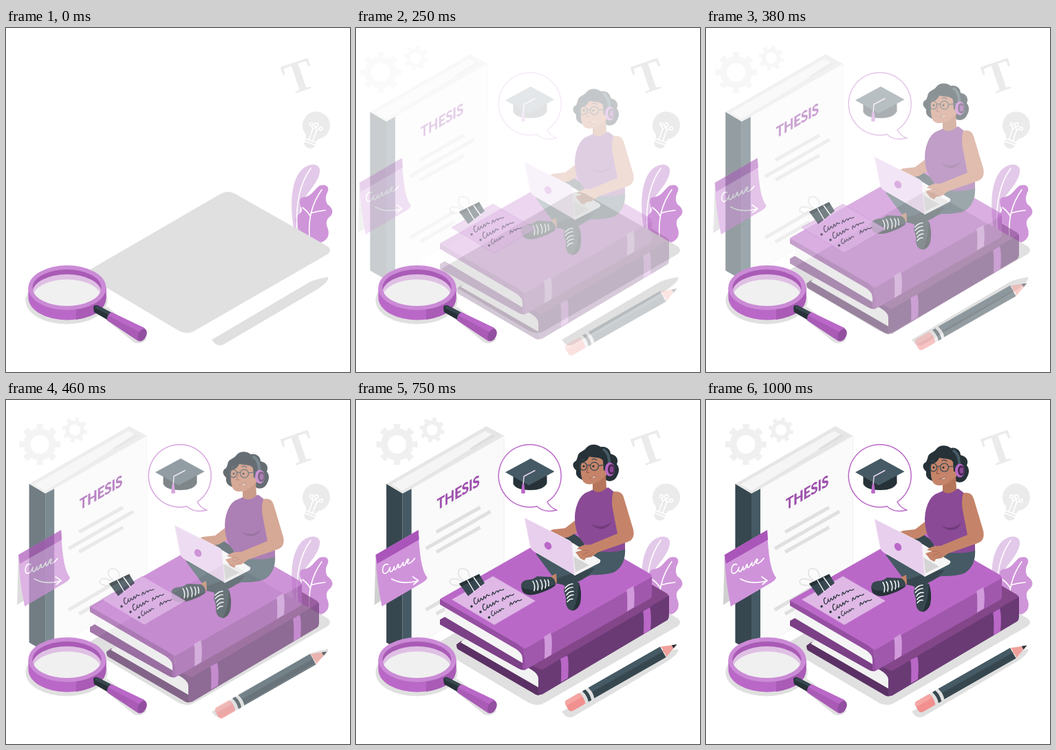
An HTML page that plays this animation: 500x500 px, repeating every 1.04 s.

```html
<!DOCTYPE html>
<html lang="en">
<head>
<meta charset="utf-8">
<title>Thesis</title>
<style>
html, body { margin: 0; width: 100%; height: 100%; overflow: hidden; background: #fff; }
svg { display: block; width: 100vw; height: 100vh; }
.line { fill: none; stroke-linecap: round; stroke-linejoin: round; }
</style>
</head>
<body>
<svg viewBox="0 0 500 500">
<defs>
  <path id="word" d="M5-8C2-10-1-2 1 0S7-3 8-5C6-4 7 1 9-1S12-5 12-3 12 0 14-1 16-5 17-4 16 0 18-1 21-5 22-4 22-1 25-2"/>
  <path id="tail" d="M0 0C1-3 3-5 3-3S3 0 5-1 7-4 9-3 8 0 10-1 13-3 14-2 15 0 19-1"/>
  <clipPath id="lens"><ellipse cx="88.500" cy="377.500" rx="50" ry="26.500"/></clipPath>
</defs>

<!-- resting scenery -->
<text transform="translate(432.500 91) rotate(-19)" text-anchor="middle" font-family="'Liberation Serif', serif" font-weight="700" font-size="66" fill="#ebebeb">T</text>
<g transform="translate(451 141.500) rotate(20)" fill="#ebebeb">
  <circle r="20"/>
  <path d="M-17 10Q-8 17-8 23H8Q8 17 17 10zM-8 24H8V30Q6 35 0 35T-8 30z"/>
  <g class="line" stroke="#fff" stroke-width="1.600">
    <path d="M-8 23.500H8M-8 27.500H8M-3 23V7L-6 3M3 23V7L6 3M-3 7L0 2 3 7"/>
    <circle cx="-7" cy="1" r="2.300"/><circle cy="-1" r="2.600"/><circle cx="8" cy="2" r="2.300"/>
  </g>
</g>
<path fill="#e3c9e9" d="M419 296C413 262 413 226 428 208 437 197 453 195 456 205 458 221 437 240 431 252 426 265 426 280 426 300z"/>
<path fill="#cf95d9" d="M441 312C428 302 422 288 421 278 422 271 430 270 430 264 428 257 424 249 431 246 444 246 448 234 456 229 463 227 470 229 468 237 464 245 464 250 467 256 474 261 477 267 472 273 464 279 465 285 468 292 471 303 466 309 457 312z"/>
<path class="line" stroke="#fff" stroke-width="1.600" d="M423 291Q420 235 443 204M441 304Q438 264 459 235M443 269Q453 266 464 265M442 273Q438 266 431 261"/>
<path fill="#e0e0e0" d="M112 357L312 241Q322 235 333 241L467 317Q475 323 467 329L276 439Q264 447 251 440z"/>
<path fill="#e0e0e0" d="M299 453L306 449 440 370Q446 366 468 362 470 364 464 371L454 379 316 460Q310 463 304 459z"/>

<!-- gears -->
<g data-move="x" fill="none" stroke="#f0f0f0">
  <g transform="translate(58 64.500)">
    <circle r="18.500" stroke-width="10"/>
    <circle r="25.500" stroke-width="9" pathLength="16" stroke-dasharray=".9 1.100" stroke-dashoffset=".45"/>
  </g>
  <g transform="translate(109 43.500) rotate(12)">
    <circle r="11" stroke-width="6"/>
    <circle r="15.500" stroke-width="5.500" pathLength="16" stroke-dasharray=".9 1.100" stroke-dashoffset=".45"/>
  </g>
</g>

<!-- standing book -->
<g data-move="x">
  <path fill="#e6e6e6" d="M42.500 122L188 38 213.500 52 66 136z"/>
  <path fill="#f5f5f5" d="M50 123L186 45 198 51 66 132z"/>
  <path fill="#dedede" d="M196 50L201 52 168 71 163 71z"/>
  <path fill="#fafafa" stroke="#ebebeb" stroke-width=".7" d="M79 129L213.500 52V282L79 359z"/>
  <path fill="#37474f" d="M42.500 122L66 136V366L42.500 352.500z"/>
  <path fill="#455a64" d="M66 136L79 129V359L66 366z"/>
  <text transform="matrix(.866 -.5 0 1 116 160)" font-family="Lato, sans-serif" font-weight="700" font-size="21.500" fill="#9c4fab" stroke="#9c4fab" stroke-width=".5">THESIS</text>
  <path fill="none" stroke="#e0e0e0" stroke-width="5" d="M115 192L179 156M100 216L194 162M115 221L179 185M100 305L165 267M115 311L165 282"/>
</g>
<g data-move="x">
  <path fill="#d0d0d0" d="M27 225L25 298 40 288 60 215z"/>
  <path fill="#cf93da" d="M27 225L89 189C90 212 92 246 102 258Q101 262 94 266L36 300Q28 262 27 225z"/>
  <path fill="#aa55b9" d="M27 225L89 189 90 203 29 238z"/>
  <g class="line" stroke="#fff" stroke-width="1.600">
    <path d="M45 239C37 236 35 250 39 252 44 253 47 246 48 243 46 249 49 252 52 247L54 242C53 248 55 248 58 243 59 237 61 238 60 243 62 246 65 239 67 236 66 243 69 242 71 236 74 228 77 231 73 236 73 240 79 237 84 230"/>
    <path d="M50 260Q66 269 88 263M81 257L89 262.500 82 268"/>
  </g>
</g>

<!-- stacked books and reader -->
<g data-move="y">
  <path fill="#5b3064" d="M146 357L153 352 266 412 270 429Q264 433 258 428L148 364Q146 362 146 357z"/>
  <path fill="#f2f2f2" d="M152 354L186 335 262 388 266 400V420z"/>
  <path fill="#834689" d="M240 384L430 270 452 283Q457 287 452 291L272 398Q265 392 240 384z"/>
  <path fill="#6a3a75" d="M246 389Q264 397 265 406V429L270 430 452 322Q455 320 455 314V286L270 394 256 388z"/>
  <path fill="#ba68c8" d="M297 378Q299 384 298 412L308 406Q310 382 307 373zM417 309Q419 315 418 342L428 336Q430 313 427 303z"/>
  <path fill="#f5f5f5" d="M129 299L238 361 244 372V390L129 323z"/>
  <path fill="#7b4086" d="M122 321L129 317 242 384 246 394Q241 395 236 392L122 328z"/>
  <path fill="#ba68c8" d="M122 291L300 190Q308 186 316 190L427 254Q433 259 427 263L246 368z"/>
  <path fill="#9f58ab" d="M236 358Q246 364 246 376V394L427 291Q430 289 430 285V259L246 363z"/>
  <path fill="#954fa2" d="M122 291L236 357Q246 364 246 376V394L242 392V378Q242 370 233 364L122 299z"/>
  <path fill="#d09adb" d="M273 346Q275 352 274 378L284 372Q286 350 283 340zM393 278Q395 284 394 309L404 303Q406 282 403 272z"/>

  <!-- legs and shoes -->
  <path fill="#37474f" d="M284 198L312 193 331 206 332 222 300 215z"/>
  <path fill="#c5846a" d="M326 171L304 188 286 190 278 194 291 198 298 203 309 201 332 188z"/>
  <path fill="#455a64" d="M330 222L391 215Q393 240 377 251 368 256 342 256L303 272 288 261 312 246z"/>
  <path fill="#455a64" d="M261 225L290 264 303 258 320 256 280 224z"/>
  <path fill="#37474f" d="M290 262L316 253 347 246Q334 266 304 271L290 268z"/>
  <path fill="#c5846a" d="M283 258L291 254 292 267 285 271z"/>
  <path fill="#37474f" d="M240 272Q240 264 250 263 258 263 263 258L284 259Q291 263 290 271 282 278 265 283 249 288 243 281z"/>
  <path fill="#263238" d="M240 273Q250 283 290 270 289 274 265 283 248 288 242 280z"/>
  <path fill="#37474f" d="M304 268Q314 262 324 267 328 281 326 295 324 306 315 308 306 307 305 296 306 288 302 280z"/>
  <path fill="#263238" d="M324 267Q329 281 326 297 323 306 315 308 324 290 324 267z"/>
  <path class="line" stroke="#fff" stroke-width="1.500" d="M257 265Q261 271 259 279M262 264Q266 270 264 278M268 263Q272 269 270 277M274 263Q277 268 275 275M279 263Q281 267 280 272M304 275Q309 269 315 269M304 280Q309 274 315 274M306 285Q310 279 316 280M307 290Q310 285 316 285M307 295Q311 290 315 291"/>

  <!-- body and laptop -->
  <path fill="#8a4a96" d="M333 137L347 131 367 129 376 136 385 170 391 210V219Q374 225 346 221 326 211 320 190 316 172 320 158 324 143 333 137z"/>
  <path fill="#6f3b7a" d="M342 182Q357 191 372 178 365 190 355 189 347 188 342 182z"/>
  <path fill="#f5f5f5" d="M314 209L355 234Q356 237 353 239L318 257 312 252z"/>
  <path fill="#d5d5d5" d="M316 229L339 242 319 252z"/>
  <path fill="#e8cfed" stroke="#f5e9f7" stroke-width=".8" d="M245 173L310 206Q314 208 314 212L318 256 258 221Q254 218 253 214z"/>
  <ellipse cx="279" cy="213.500" rx="4.800" ry="6" transform="rotate(-35 279 213.500)" fill="#ba68c8"/>
  <path fill="#c5846a" d="M374 135Q386 133 389 143L403 190Q406 204 395 208L352 223 342 230 334 231 332 235 326 232 319 223Q324 221 329 220L321 218Q328 211 341 212L380 196 374 165Q370 148 374 135z"/>
  <path class="line" stroke="#a56951" stroke-width=".8" d="M329 220L337 220M330 226L340 222M334 231L344 224"/>

  <!-- head -->
  <path fill="#263238" d="M322 85C323 76 331 77 335 71 341 64 351 66 356 70 364 68 370 74 370 80 379 82 382 88 379 95 384 101 382 108 379 113 375 121 366 121 362 117L330 118C318 114 320 107 320 104 313 98 315 92 320 90z"/>
  <path fill="#b5755b" d="M344 116L363 107 364 130Q352 140 344 132z"/>
  <path fill="#c5846a" d="M328 90C326 101 326 112 330 120 334 126 346 125 353 120L365 110 363 90 350 80 334 84z"/>
  <path fill="#263238" d="M326 94C333 92 337 89 339 84 346 86 355 84 359 90L360 104 366 105 372 85 350 70 330 77z"/>
  <path fill="none" stroke="#455a64" stroke-width="4" d="M359 73Q369 79 368 95"/>
  <ellipse cx="369" cy="102.500" rx="7" ry="10" fill="#ba68c8"/>
  <ellipse cx="371" cy="102.500" rx="5" ry="7.500" fill="#4a2852"/>
  <ellipse cx="371.500" cy="102.500" rx="2.800" ry="4.500" fill="#8a4a96"/>
  <g class="line" stroke="#37474f" stroke-width="1.200">
    <ellipse cx="330.500" cy="98" rx="5" ry="5.800"/><circle cx="346.500" cy="98" r="6"/>
    <path d="M335.500 97Q338 95 340.500 97M352.500 97L363 96M327 89L332 88M343 88Q347 86 350 89"/>
  </g>
  <g fill="#263238"><circle cx="331" cy="98" r="1.500"/><circle cx="345" cy="98" r="1.500"/></g>
  <path class="line" stroke="#91543f" stroke-width="1" d="M338 98L335 107 339 107"/>
  <path fill="#fff" stroke="#91543f" stroke-width=".6" d="M339 115Q345 115 348 111 348 117 339 115z"/>
</g>

<!-- notes with binder clip -->
<g data-move="" data-fade=".6">
  <path fill="#dfb8e6" stroke="#c583d0" stroke-width=".6" d="M139 290L199 256 261 292 201 327z"/>
  <g fill="#263238"><circle cx="168" cy="300" r="1.800"/><circle cx="181" cy="308" r="1.800"/><circle cx="193.500" cy="316" r="1.800"/></g>
  <g class="line" stroke="#263238" stroke-width="1.200">
    <use href="#word" transform="translate(173 297) rotate(-28)"/>
    <use href="#tail" transform="translate(198 284) rotate(-25)"/>
    <use href="#word" transform="translate(186 306) rotate(-28)"/>
    <use href="#tail" transform="translate(213 292) rotate(-28)"/>
    <use href="#word" transform="translate(198 314) rotate(-28) scale(.8)"/>
    <use href="#tail" transform="translate(224 299) rotate(-25)"/>
  </g>
  <path class="line" stroke="#e3e3e3" stroke-width="1.700" d="M155 268C143 272 133 267 137 262 140 258 150 260 156 265M156 262C145 254 148 245 155 245 164 246 164 252 165 257"/>
  <path fill="#37474f" d="M150 267L179 253 187 266 163 285z"/>
  <path fill="#263238" d="M150 267L179 253 181 257 153 271z"/>
  <path class="line" stroke="#fff" stroke-width="1.400" d="M162 262L172 279M171 258L181 272"/>
</g>

<!-- speech bubble -->
<g data-move="" data-fade="1.500">
  <path fill="#fff" stroke="#ba68c8" stroke-width="1.500" d="M263 154.500A45.500 45.500 0 1 1 278 148Q282 156 291.500 160 274 165 263 154.500z"/>
  <path fill="#263238" d="M228.500 108V122Q233 131 253 131T277.500 121V108z"/>
  <path fill="#455a64" d="M217 105L254 85 288.500 104 251 124z"/>
  <path class="line" stroke="#ead5ee" stroke-width="1.500" d="M260 102.500L244 111 243 124"/>
  <path fill="#ba68c8" d="M241.500 122H244.500L246 135Q243 137 240 135z"/>
</g>

<!-- magnifier -->
<g>
  <ellipse cx="88" cy="396" rx="59.500" ry="34.500" fill="#e0e0e0"/>
  <path fill="#e0e0e0" d="M125 420L136 416 186 457Q197 461 204 452L147 405z"/>
  <path fill="#ba68c8" d="M32.500 377V392A56.500 32.500 0 0 0 145.500 392V377z"/>
  <path fill="#a95bb6" d="M102 400V424Q145 417 145.500 392V377z"/>
  <ellipse cx="89" cy="377.500" rx="56.500" ry="32.500" fill="#cb8bd6"/>
  <g clip-path="url(#lens)">
    <path fill="#a95bb6" d="M30 340H150V410H30z"/>
    <ellipse cx="88.500" cy="384.500" rx="50" ry="26.500" fill="#dfc0e4"/>
    <ellipse cx="88.500" cy="392" rx="50" ry="26.500" fill="#f0f0f0"/>
  </g>
  <path fill="#263238" d="M127 406Q128 402 133 403L154 414 149 425 128 413z"/>
  <path fill="#37474f" d="M131 403L154 414 152 418 129 407z"/>
  <path fill="#a95bb6" d="M153 413L201 436Q207 442 203 449 199 457 192 455L147 425Q146 417 153 413z"/>
  <path fill="#ba68c8" d="M153 413L201 436 196 443 149 418z"/>
  <ellipse cx="198" cy="446" rx="5.800" ry="9.300" transform="rotate(27 198 446)" fill="#934fa0"/>
</g>

<!-- pencil -->
<g data-move="y"><g transform="translate(310 446) rotate(-29.700)">
  <rect x="-4" y="-9" width="29" height="18" rx="5" fill="#f28f8f"/>
  <path fill="#f5a6a3" d="M0-9H22V-2H-4Q-4-9 0-9z"/>
  <path fill="#e0e0e0" d="M22-9H38V9H22Q25 0 22-9z"/>
  <path fill="#37474f" d="M27-9H32Q35 0 32 9H27Q30 0 27-9zM37-9H157V8.500H37Q40 0 37-9z"/>
  <path fill="#455a64" d="M37-9H157V-1H39z"/>
  <path fill="#f0a09a" d="M157-9L180 0 157 8.500Q160 4 157-1 160-5 157-9z"/>
  <path fill="#263238" d="M173-2.800L180 0 173 2.700z"/>
</g></g>
</svg>
<script>
const LOOP = 1040, STEPS = 24, SHIFT = 30;
const parts = document.querySelectorAll('[data-move]');

// cubic-bezier(.36, -.01, .5, 1.38)
const bezier = (s, a, b) => 3 * (1 - s) ** 2 * s * a + 3 * (1 - s) * s * s * b + s ** 3;
function ease(x) {
  if (x >= 1) return 1;
  let lo = 0, hi = 1;
  for (let i = 0; i < 25; i++) {
    const mid = (lo + hi) / 2;
    if (bezier(mid, .36, .5) < x) lo = mid; else hi = mid;
  }
  return bezier(lo, -.01, 1.38);
}

function draw(now) {
  const step = Math.floor((now % LOOP + 5.5) / 1000 * STEPS);
  const p = step < 2 ? 0 : ease((step + .5) / STEPS);
  const d = (1 - p) * SHIFT;
  for (const part of parts) {
    const { move, fade = 1 } = part.dataset;
    part.setAttribute('opacity', Math.min(1, p ** fade));
    part.setAttribute('transform', `translate(${move === 'x' ? -d : 0} ${move === 'y' ? d : 0})`);
  }
}

const start = performance.now();
function tick() {
  draw(performance.now() - start);
  requestAnimationFrame(tick);
}
tick();
</script>
</body>
</html>
```
